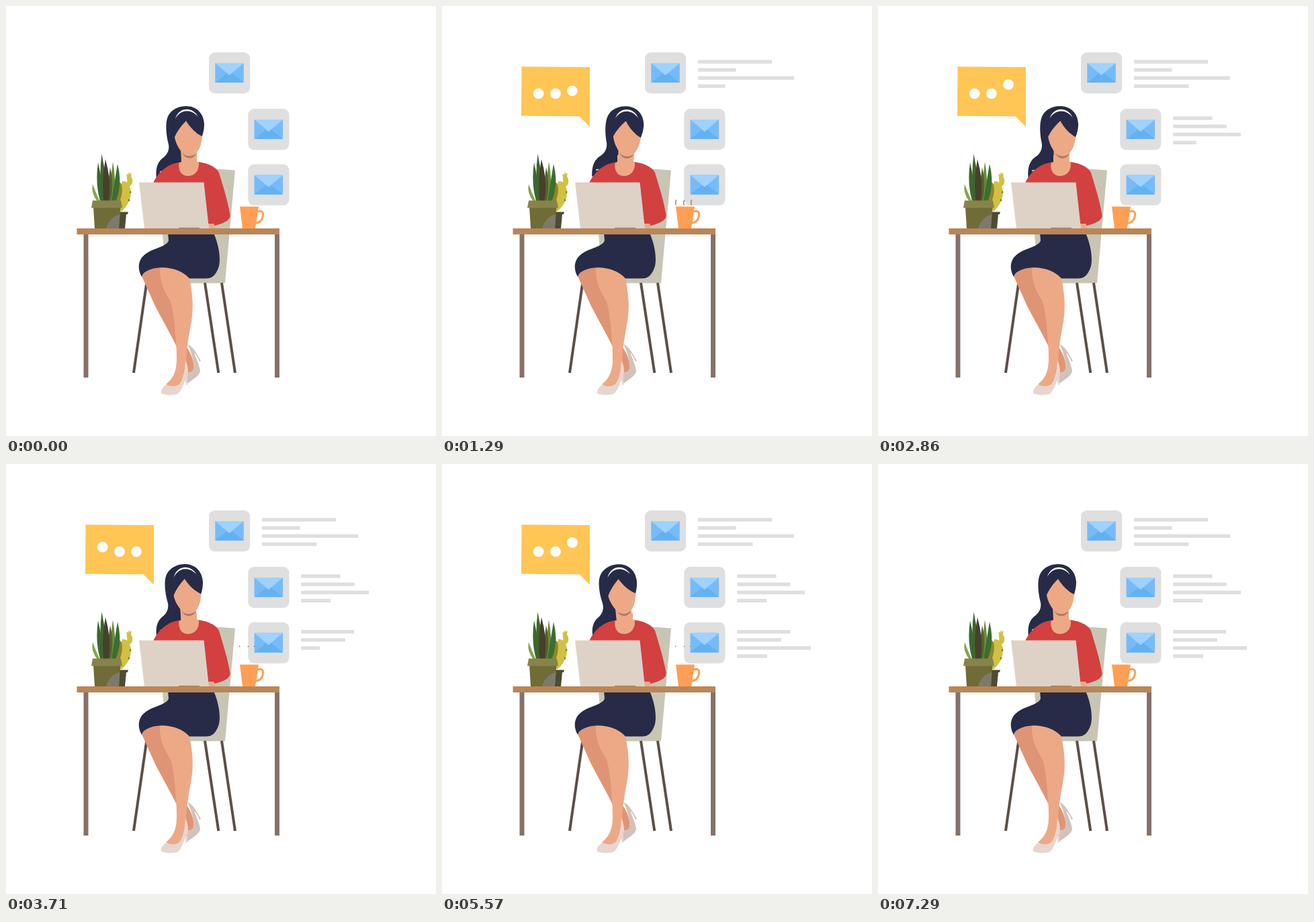
An HTML page for the animation above (7.57 s loop, 640 px wide and 640 px high).

```html
<!DOCTYPE html>
<html lang="en">
<head>
<meta charset="utf-8">
<title>Answering mail at the desk</title>
<style>
  html, body { margin: 0; width: 100%; height: 100%; overflow: hidden; background: #fff; }
  svg { display: block; width: 100%; height: 100%; }
</style>
</head>
<body>
<svg viewBox="0 0 640 640">
  <defs>
    <g id="card">
      <rect width="61.2" height="61.2" rx="9" fill="#dfdfdf"/>
      <g transform="translate(9.3 16)">
        <path d="M0 0H42.5V29H0Z" fill="#76bbf9"/>
        <path d="M0 29L21.2 12L42.5 29Z" fill="#64b1f0"/>
        <path d="M0 0H42.5L21.2 18Z" fill="#9fd2ff"/>
      </g>
    </g>
  </defs>

  <use href="#card" x="302" y="69"/>
  <use href="#card" x="360.3" y="153"/>
  <use href="#card" x="360.3" y="235.6"/>
  <g id="lines" fill="#dfdfdf"></g>

  <g id="bubble">
    <path d="M118.5 90.3L220 91V179.7L204.5 164.2L118 163.5Z" fill="#ffc555"/>
    <g id="dots" fill="#fff"></g>
  </g>

  <!-- chair -->
  <path d="M300 241.5L341 244.5L326 412.5H240L232 330Z" fill="#c9c5b4"/>
  <path d="M209 414L190 546M296 412L316.300 546M321 412L341 546" stroke="#5c4e48" stroke-width="4" fill="none"/>

  <!-- legs and shoes -->
  <path d="M202 402C206 394 216 389 232 388L250 440L262 502C272 508 279 524 280 538C279 545 273 548 266 544L254 507C243 484 224 452 219 440Z" fill="#df9575"/>
  <path d="M270 503C278 506 284 518 290 528L288 529.500C286 524 283 519 280 516C283 524 289 537 289 544C287 552 275 557 269 563L266 544C275 547 279 543 279 538C279 526 276 515 270 503Z" fill="#d2c2bc"/>
  <path d="M229 388C250 386 268 394 273 405C279 435 279 453 275 475C271 497 268 515 268 530C266 547 262 560 257 566C250 569 243 568 238 563C248 555 254 545 254 525C254 500 250 450 244 438C236 426 228 410 229 388Z" fill="#eda985"/>
  <path d="M267 527C271 535 272 544 270 551V564H268L267 557C263 566 260 575 255 577.500C247 580 236 579 231 576.500C229 572 234 567 239 563C243 567 252 567 258 563C264 555 266 545 267 527Z" fill="#e8d5cf"/>
  <path d="M241 338H309C318 358 320 380 316 390C312 401 306 405.500 298 405.500H273C262 393 241 387 223 390C212 392 204 396 202 403C197 394 196 385 201 376C212 360 239 360 242 349Z" fill="#272b47"/>

  <g id="hair">
    <path d="M268 149C284 149 294 160 295 175C295 185 293 190 292 194L268 200L261 222V234L238 254L224 257C222 241 226 231 235 225C242 219 243 212 242 206C239 195 237 180 239.500 169C243 155 256 149 268 149Z" fill="#272b47"/>
    <path d="M229 247L233 246" stroke="#e8e6e6" stroke-width="1.500"/>
  </g>
  <path d="M219 264C222 256 229 246 240 239C247 235 252 233.500 259 232.500L284 232C297 233 312 238 317 248C323 268 330 290 333.500 311C334 319 325 323 310 327L309 324H301V331H206Z" fill="#d24040"/>
  <path d="M301 324.500H310V331H301Z" fill="#eda985"/>
  <path d="M257.500 233.500C256 246 262 253 271 253C281 253 288 245 287 233L284 231V222H261V232Z" fill="#eda985"/>
  <g id="face">
    <path d="M260 212H284V231L261 232Z" fill="#eda985"/>
    <path d="M262 217C265 229 279 229 283 220Z" fill="#b37a64"/>
    <path d="M268 171C274 181 283 190 292 194C291 207 287 216 282 220C276 225 266 224 262 218C257 212 252 203 251 195C255 186 261 178 268 171Z" fill="#eda985"/>
    <path d="M252 168C257 150 278 149 286 165C276 153 260 153 252 168Z" fill="#fff"/>
  </g>

  <!-- laptop, plants, mug, table -->
  <path d="M198 262.500H294.500L302 331H206Z" fill="#ded2c7"/>
  <path d="M257 330.500H288" stroke="#a38672" stroke-width="1.500"/>
  <path d="M173 261C181 259 186 269 186 278C186 290 178 301 171 306L165 292Z" fill="#d0c143"/>
  <path d="M179 265C182 262 179 257 180 254L179 250L182 251L183 247L185 250L187 248L186 254C189 257 189 264 186 267C184 269 181 270 178 270Z" fill="#d0c143"/>
  <path d="M166 263C174 258 175 278 169 291H163Z" fill="#938329"/>
  <path d="M184 275l3 2-3 2M182 287l3 2-3 2" fill="#77762c"/>
  <g id="leaves"></g>
  <path d="M164 306.500H182L181 310H179L177 331H160Z" fill="#4c4b33"/>
  <path d="M130 299H170.500L168 331H132Z" fill="#6f6c38"/>
  <path d="M149 331C152 320 160 312 169.500 310L168 331Z" fill="#7f796b"/>
  <path d="M129 289.500H171L173 300.500H127Z" fill="#87834a"/>
  <path d="M348 298.500H376L371 331H352Z" fill="#ff9f55"/>
  <path d="M374 306C381 304 383.500 307 382.500 312C381 320 376 323 371 323" stroke="#ff9f55" stroke-width="3" fill="none"/>
  <g id="steam" fill="none" stroke="#ad7a4c" stroke-width="1.500">
    <path pathLength="1" d="M349 297C344 291 354 285 349 279C350 276 351 273 347 271"/>
    <path pathLength="1" d="M361 297C356 291 366 285 361 278C359 276 359 274 361 271"/>
    <path pathLength="1" d="M372 297C367 291 376 285 373 277C372 275 372 273 369 271"/>
  </g>
  <path d="M115.500 339H122.500V553H115.500ZM400 339H407V553H400Z" fill="#84726a"/>
  <path d="M105.500 331H407V340H105.500Z" fill="#ba8656"/>
</svg>
<script>
const LOOP = 7570;
const $ = id => document.getElementById(id);
const clamp = v => Math.min(1, Math.max(0, v));
const span = (t, from, to) => clamp((t - from) / (to - from));
const smooth = p => p * p * (3 - 2 * p);

function add(parent, tag, attrs) {
  const node = document.createElementNS("http://www.w3.org/2000/svg", tag);
  for (const key in attrs) node.setAttribute(key, attrs[key]);
  return parent.appendChild(node);
}

// Text lines beside each card: left, top, widths.
const blocks = [
  [381, 80.3, [110, 56.5, 143, 81.5]],
  [439.2, 164.3, [58.3, 79.5, 101, 44]],
  [439.2, 247, [78.8, 65.8, 109.8, 44.8]]
];
const lines = blocks.flatMap(([x, y, widths]) => widths.map((width, i) =>
  ({ width, node: add($("lines"), "rect", { x, y: y + 12.1 * i, width: 0, height: 5.4 }) })));

const dots = [143.7, 169, 194].map(x => ({ x, node: add($("dots"), "circle", { cx: x }) }));

// Leaves: tip x, tip y, base x, half width, colour.
[
  [129, 265, 138, 3, "#86a550"],
  [137, 233, 143, 4.5, "#39682f"],
  [142.5, 220, 147, 5, "#41652c"],
  [159, 232, 156, 4, "#6c8a3c"],
  [166, 235, 160, 5, "#396f31"],
  [155, 240, 153, 4, "#50632d"],
  [148, 228, 149, 6, "#47402a"]
].forEach(([tx, ty, x, w, fill]) => {
  const mid = ty + (290 - ty) * 0.55;
  add($("leaves"), "path", {
    fill, d: `M${tx} ${ty}Q${tx - w} ${mid} ${x - w * 0.6} 291H${x + w * 0.6}Q${tx + w * 1.6} ${mid} ${tx} ${ty}Z`
  });
});

function headAngle(t) {
  const right = 5.4, left = -5.1;
  if (t < 1800) return right * smooth(t / 1800);
  if (t < 4900) return right + (left - right) * smooth(span(t, 1800, 4900));
  return left * (1 - smooth(span(t, 4900, 7290)));
}

function bubbleScale(t) {
  if (t < 860) return 1.2 * span(t, 420, 833);
  if (t < 6450) return 1.2 - 0.2 * smooth(span(t, 860, 1050));
  return 1 - smooth(span(t, 6450, 6900));
}

// The dots hop one after another, from right to left.
function hop(t, index) {
  const period = 1355, width = 680;
  const peak = 3540 - 340 * index;
  const offset = ((t - peak + period / 2) % period + period) % period - period / 2;
  return Math.abs(offset) < width / 2 ? Math.cos(Math.PI * offset / width) ** 2 : 0;
}

function drawSteam(t) {
  const p = ((t - 1150 + LOOP) % 925) && t >= 1150 ? ((t - 1150) % 925) / 750 : 1;
  const visible = t > 1150 && t < 6290 && p < 1;
  $("steam").style.display = visible ? "" : "none";
  const head = clamp(p * 1.7), tail = smooth(clamp((p - 0.1) / 0.98));
  for (const path of $("steam").children) {
    path.setAttribute("stroke-dasharray", `0 ${tail} ${Math.max(0, head - tail)} 2`);
  }
}

function render(t) {
  const turn = `rotate(${headAngle(t)} 268 246)`;
  $("hair").setAttribute("transform", turn);
  $("face").setAttribute("transform", turn);

  lines.forEach(({ width, node }, i) => {
    const start = Math.max(30, 361 * i - 10);
    node.setAttribute("width", width * span(t, start, 361 * i + 430));
  });

  $("bubble").setAttribute("transform", `translate(220 180) scale(${bubbleScale(t)}) translate(-220 -180)`);
  dots.forEach(({ node }, i) => {
    node.setAttribute("r", 7.9 * smooth(span(t, 900 + 80 * i, 1150 + 80 * i)));
    node.setAttribute("cy", 130.3 - 13.5 * hop(t, i));
  });

  drawSteam(t);
}

const began = performance.now();
function tick() {
  render((performance.now() - began) % LOOP);
  requestAnimationFrame(tick);
}
render(0);
requestAnimationFrame(tick);
</script>
</body>
</html>
```
